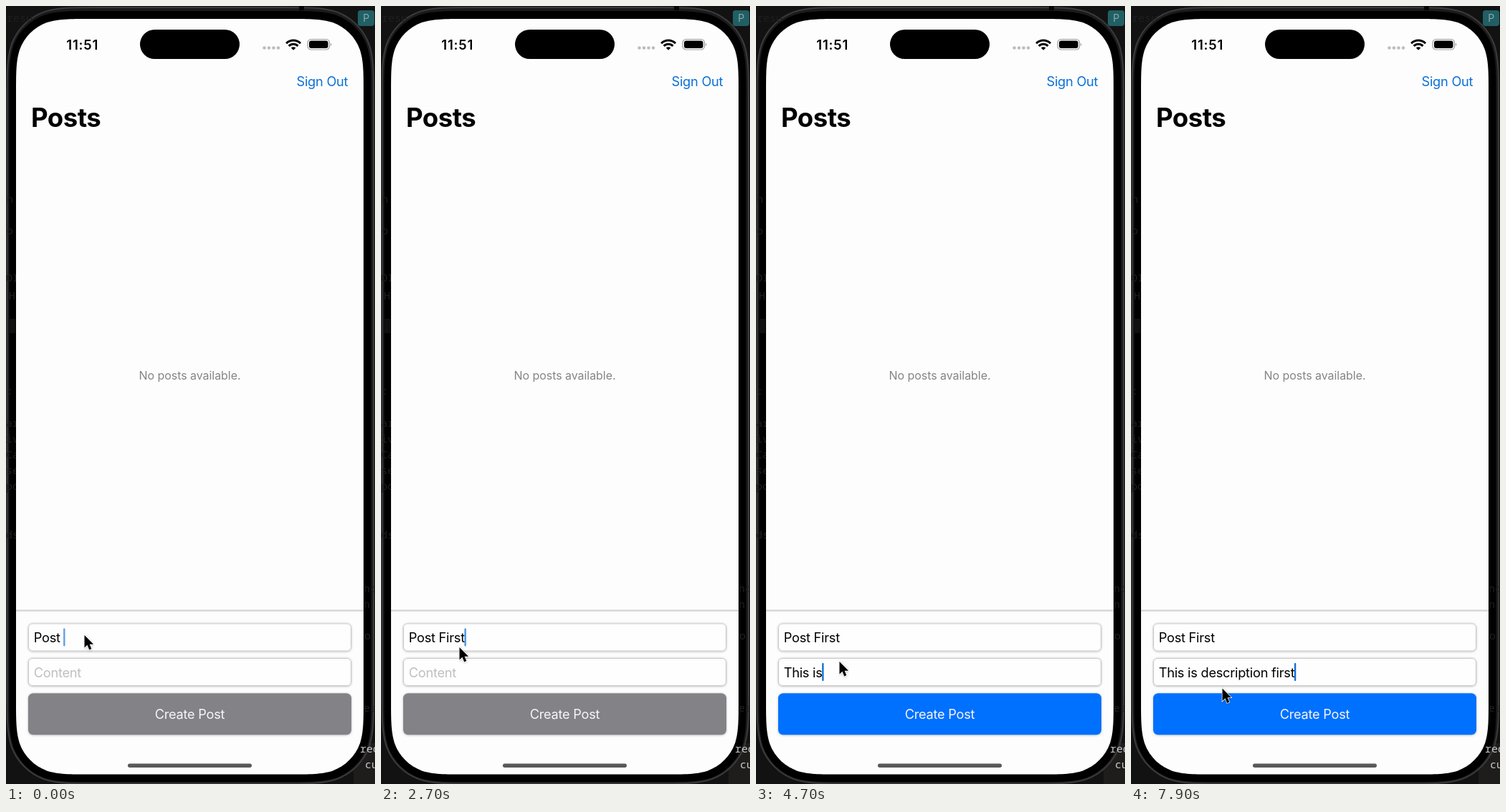
Recreate the animation shown at these times as an HTML page. Size 515x1087 px, loop 8000 ms.

```html
<!DOCTYPE html>
<html lang="en">
<head>
<meta charset="utf-8">
<title>Posts</title>
<style>
  html, body { margin: 0; height: 100%; overflow: hidden; background: #121213; }
  svg { display: block; width: 100%; height: 100%; }
  text { font: 18.2px Inter, Roboto, sans-serif; letter-spacing: -.24px; white-space: pre; font-optical-sizing: none; }
  .mid { text-anchor: middle; }
  #code text { font: 15px "Noto Sans Mono", monospace; letter-spacing: 0; }
  .field { fill: #fefefe; stroke: #cacaca; filter: url(#soft); }
</style>
</head>
<body>
<svg viewBox="0 0 515 1087">
  <defs>
    <filter id="soft" x="-5%" y="-30%" width="110%" height="160%">
      <feDropShadow dx="0" dy="0.5" stdDeviation="1.5" flood-opacity=".3"/>
    </filter>
    <linearGradient id="edge" x2="0" y2="1">
      <stop stop-color="#fdfdfd"/><stop offset=".65" stop-color="#cbcbcb"/><stop offset="1" stop-color="#fdfdfd"/>
    </linearGradient>
  </defs>

  <!-- desktop behind the phone -->
  <rect width="515" height="1087" fill="#121213"/>
  <rect x="485" y="1030" width="30" height="57" fill="#1f1d1b"/>

  <!-- phone body -->
  <path id="shell" fill="#1b1b1c" stroke="#3b3b3d" stroke-width="2"/>
  <path id="bezel"/>
  <g id="code" fill="#1f1f20"></g>
  <rect x="409" width="7" height="6" fill="#050505"/>
  <rect x="491" y="6" width="23" height="22" rx="4" fill="#215f64"/>
  <text class="mid" x="502.5" y="22" style="font-size:14px" fill="#86acaf">P</text>
  <path id="screen" fill="#fdfdfd"/>

  <!-- status bar -->
  <text class="mid" x="106.7" y="61" style="font-size:18.6px;font-weight:600;letter-spacing:.8px">11:51</text>
  <rect x="187" y="33" width="139" height="41" rx="20.5"/>
  <path d="M360.5 58.5h20" stroke="#bdbdbf" stroke-width="4.6" stroke-linecap="round" stroke-dasharray="0 6.5"/>
  <g fill="none" stroke="#000" stroke-width="3">
    <path d="M391.2 52.2a14 14 0 0 1 19.8 0"/>
    <path d="M394.7 55.9a9 9 0 0 1 12.8 0"/>
  </g>
  <path d="M401.1 61.8l-3.2 -3.2a4.6 4.6 0 0 1 6.4 0z"/>
  <rect x="421" y="46.5" width="30.5" height="14.5" rx="4.8" fill="none" stroke="#9b9b9d" stroke-width="1.2"/>
  <rect x="423" y="48.5" width="26.5" height="10.5" rx="3"/>
  <path d="M453 51.5q2.4 2.3 0 4.8z" fill="#9b9b9d"/>

  <!-- page -->
  <text x="477.3" y="111.5" text-anchor="end" fill="#0a70d8">Sign Out</text>
  <text x="35" y="169" style="font-size:36.5px;font-weight:700;letter-spacing:-.5px">Posts</text>
  <text class="mid" x="256.5" y="522" style="font-size:16px;letter-spacing:-.05px" fill="#858588">No posts available.</text>

  <!-- form -->
  <rect x="14" y="842.5" width="485" height="4" fill="url(#edge)"/>
  <rect class="field" x="31.5" y="863" width="450" height="38" rx="5.5"/>
  <rect class="field" x="31.5" y="911.5" width="450" height="38" rx="5.5"/>
  <rect id="button" x="31" y="960.3" width="451" height="58" rx="7" filter="url(#soft)"/>
  <text class="mid" x="256.5" y="996" fill="#f6f6f8">Create Post</text>
  <text id="title" x="38.7" y="889.3"></text>
  <text id="content" x="38.7" y="937.8"></text>
  <rect id="caret" width="2.4" height="25" rx="1" fill="#0f6fd8"/>
  <rect x="170" y="1058.5" width="173" height="5.5" rx="2.7" fill="#59595b"/>

  <path id="pointer" d="M0 0V17.6L4 13.8L6.7 20.4L9.8 19.1L7.1 12.7H12.6Z"
        stroke="#fff" stroke-width="1.4" paint-order="stroke" filter="url(#soft)"/>
</svg>
<script>
const $ = id => document.getElementById(id);
const LOOP = 8000, STEP = 100, CLICK = 2900;

// rounded box whose corners ease into the straight sides
function smoothBox(x, y, w, h, r) {
  const bend = [[0, 1.5287], [0, 1.0885], [0, .8684], [.0749, .6315], [.1691, .3728],
    [.3728, .1691], [.6315, .0749], [.8684, 0], [1.0885, 0], [1.5287, 0]];
  const corner = (right, low) => {
    const pts = bend.map(([a, b]) => [right ? x + w - a * r : x + a * r, low ? y + h - b * r : y + b * r]);
    if (right !== low) pts.reverse();
    return pts;
  };
  const trace = ([first, ...rest]) => `L${first}C${rest.join(' ')}`;
  const corners = [corner(false, false), corner(true, false), corner(true, true), corner(false, true)];
  // turn each corner so the outline runs clockwise
  if (corners[0][0][0] > x) corners.forEach(c => c.reverse());
  return corners.map(trace).join('').replace('L', 'M') + 'Z';
}
$('shell').setAttribute('d', smoothBox(1.5, 2, 511.5, 1084.5, 82));
$('bezel').setAttribute('d', smoothBox(4.5, 7, 505, 1077, 77));
$('screen').setAttribute('d', smoothBox(14, 18, 485, 1055.5, 68));

// faint scraps of the editor: x, baseline, text
const scraps = [
  [1, 22, 'resu'], [1, 275, 'n'], [1, 319, 'o'], [0, 385, 'OI'], [4, 410, 'H'], [1, 543, ':'],
  [0, 588, 'ar'], [0, 610, 'iv'], [0, 632, 'Ca'], [0, 654, 'se'], [0, 676, 'po'], [0, 744, 'ds'],
  [499, 819, 'nc'], [499, 841, 'n'], [500, 885, 'o'], [499, 986, 'es'], [494, 1043, 'red'], [501, 1065, 'cu']
];
$('code').innerHTML = scraps.map(([x, y, s]) =>
  `<text x="${x}" y="${y}"${y > 1000 ? ' fill="#c9c9c9"' : ''}>${s}</text>`).join('')
  + '<rect x="5" y="437" width="8" height="20" fill="#101011"/>';

// start text, added text and the time of each added letter
const title = { start: 'Post ', add: 'First', keys: [1500, 1900, 2100, 2300, 2500] };
const content = { start: '', add: 'This is description first', keys: [
  4100, 4200, 4300, 4400, 4500, 4600, 4700, 4900, 5000, 5100, 5300, 5500, 5700,
  5800, 5900, 6100, 6300, 6500, 6600, 7000, 7200, 7400, 7500, 7700, 7800] };

// pointer path: time, x, y
const path = [[0, 109.5, 879], [2600, 109.5, 879], [2700, 109.5, 896], [2900, 116.5, 916],
  [7400, 116.5, 916], [7800, 127.5, 953.5], [LOOP, 127.5, 953.5]];

const clamp = v => Math.min(1, Math.max(0, v));
const mix = (a, b, k) => a + (b - a) * k;

function typed(field, t) {
  return field.start + field.add.slice(0, field.keys.filter(k => k <= t).length);
}

function pointerAt(t) {
  const i = path.findIndex(p => p[0] > t), [a, b] = [path[i - 1], path[i]];
  const k = (t - a[0]) / (b[0] - a[0]);
  return [mix(a[1], b[1], k), mix(a[2], b[2], k)];
}

function blink(u) {
  u %= 1000;
  return u < 200 ? .65 + .35 * u / 200 : clamp((700 - u) / 400);
}

function draw(t) {
  const second = t >= CLICK;
  const body = typed(content, t);
  $('title').textContent = typed(title, t);
  $('content').textContent = body || 'Content';
  $('content').setAttribute('fill', body ? '#000' : '#bfbfc1');

  const field = $(second ? 'content' : 'title');
  const width = second && !body ? 0 : field.getComputedTextLength();
  const last = [...title.keys, CLICK, ...content.keys].filter(k => k <= t).pop();
  const caret = $('caret');
  caret.setAttribute('x', 38.7 + Math.max(.4, width - .5));
  caret.setAttribute('y', second ? 918 : 869.5);
  caret.setAttribute('opacity', blink(last === undefined ? t : t - last + 200));

  const k = clamp((t - content.keys[0] + STEP) / 300);
  $('button').setAttribute('fill', `rgb(${mix(131, 0, k)},${mix(130, 111, k)},${mix(135, 255, k)})`);
  $('pointer').setAttribute('transform', `translate(${pointerAt(t)})`);
}

function frame(now) {
  draw(Math.floor(now % LOOP / STEP) * STEP);
  requestAnimationFrame(frame);
}
draw(0);
requestAnimationFrame(frame);
</script>
</body>
</html>
```
